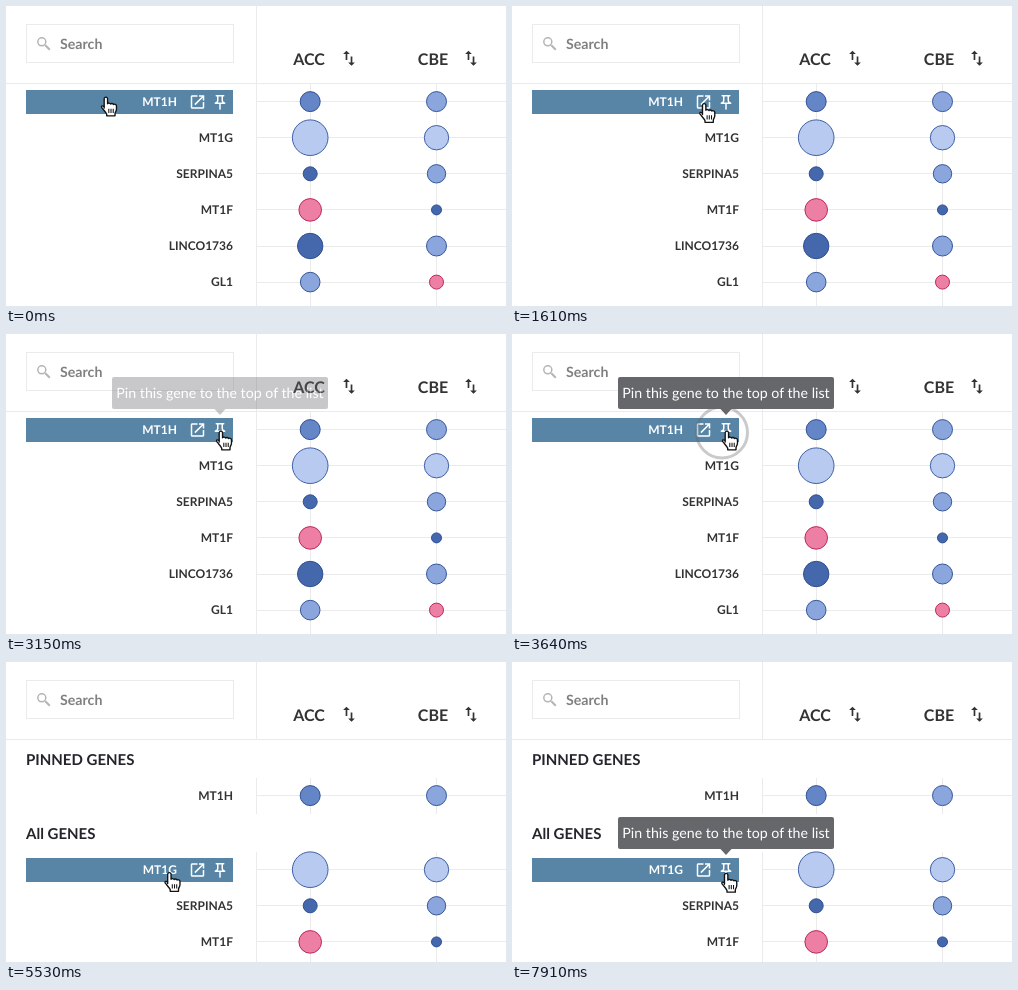
These frames come from a looping animation (500 px wide and 300 px high, 8000 ms). An HTML page:

```html
<!DOCTYPE html>
<html lang="en">
<head>
<meta charset="utf-8">
<title>Pin a gene</title>
<style>
  html, body { margin: 0; width: 100%; height: 100%; overflow: hidden; background: #fff; }
  svg { display: block; width: 100vw; height: 100vh; }
  text { font-family: Lato, "Open Sans", sans-serif; font-weight: 700; fill: #333; text-rendering: geometricPrecision; }
  .search { font-size: 14.2px; fill: #808080; }
  .col { font-size: 16px; text-anchor: middle; }
  .head { font-size: 15px; fill: #24242c; }
  .row { font-size: 12px; text-anchor: end; }
  .tip text { font-size: 14.2px; font-weight: 400; fill: #fff; text-anchor: middle; }
  .tip path, .tip rect { fill: #65676b; }
  .bar rect { fill: #5885a6; }
  .bar text, .bar path { fill: #fff; }
  .line { fill: none; stroke: #ebebeb; }
  .hand { fill: #fff; stroke: #111; stroke-width: 1.3; stroke-linejoin: round; }
  .arrow { fill: #555; stroke: #fff; opacity: .88; }
</style>
</head>
<body>
<svg id="stage" viewBox="0 0 500 300" xmlns="http://www.w3.org/2000/svg"></svg>
<script>
const LOOP = 8000, STEP = 70, LAST = 7910;
const COLS = [304.2, 430.5];

const TONES = {
  pale: ['#b9caf0', '#3f60a5'],
  light: ['#8aa6dd', '#35569c'],
  mid: ['#6485c6', '#2f4f96'],
  dark: ['#4568ac', '#2f4f94'],
  pink: ['#ec7fa3', '#bd2a60']
};

// name, then radius and tone for each column
const GENES = [
  ['MT1H', 10, 'mid', 10, 'light'],
  ['MT1G', 17.8, 'pale', 12.2, 'pale'],
  ['SERPINA5', 7, 'dark', 9.2, 'light'],
  ['MT1F', 11.3, 'pink', 5, 'dark'],
  ['LINCO1736', 12.7, 'dark', 10, 'light'],
  ['GL1', 9.8, 'light', 7, 'pink']
];

const ICONS = {
  sort: 'M9 3L5 7h3v7h2V7h3L9 3zm7 14v-7h-2v7h-3l4 4 4-4h-3z',
  open: 'M19 19H5V5h7V3H5c-1.1 0-2 .9-2 2v14c0 1.1.9 2 2 2h14c1.1 0 2-.9 2-2v-7h-2v7z' +
        'M14 3v2h3.6l-9.8 9.8 1.4 1.4L19 6.4V10h2V3h-7z',
  pin: 'M14 4v5c0 1.1.4 2.2 1 3H9c.6-.9 1-1.9 1-3V4h4m3-2H7c-.6 0-1 .4-1 1s.4 1 1 1h1v5' +
       'c0 1.7-1.3 3-3 3v2h6v7l1 1 1-1v-7h6v-2c-1.7 0-3-1.3-3-3V4h1c.6 0 1-.4 1-1s-.4-1-1-1z'
};

const icon = (name, x, y, k, fill = '#333') =>
  `<path d="${ICONS[name]}" fill="${fill}" fill-rule="evenodd" transform="translate(${x - 12 * k} ${y - 12 * k}) scale(${k})"/>`;
const text = (cls, x, y, s) => `<text class="${cls}" x="${x}" y="${y}">${s}</text>`;
const line = d => `<path class="line" d="${d}"/>`;
const crisp = v => Math.floor(v) + .5;

function dot(x, y, r, tone) {
  const [fill, stroke] = TONES[tone];
  return `<circle cx="${x}" cy="${y}" r="${r}" fill="${fill}" stroke="${stroke}"/>`;
}

function row([name, r1, tone1, r2, tone2], i, dy) {
  const y = 95.6 + 36.1 * i + dy;
  return line(`M251 ${crisp(y)}H500`) +
    dot(COLS[0], y, r1, tone1) + dot(COLS[1], y, r2, tone2) +
    text('row', 227, Math.round(y + 4.2), name);
}

const uprights = (top, end) => line([250, ...COLS].map(x => `M${crisp(x)} ${top}V${end}`).join(''));

const bar = (id, name, y) => `<g class="bar" id="${id}">
  <rect x="20" y="${y - 12}" width="207" height="24"/>
  ${text('row', 171, y + 4, name)}
  ${icon('open', 191.5, y, .75, '#fff')}${icon('pin', 214, y + .4, .75, '#fff')}</g>`;

const tip = (id, label, x, y, w) => `<g class="tip" id="${id}">
  <rect x="${x - w / 2}" y="${y}" width="${w}" height="32" rx="2"/>
  <path d="M${x - 6} ${y + 31.5}h12l-6 6.5z"/>
  ${text('', x, y + 21, label)}</g>`;
const pinTip = (id, y) => tip(id, 'Pin this gene to the top of the list', 214, y, 216);

document.getElementById('stage').innerHTML = `
  <rect width="500" height="300" fill="#fff"/>
  ${line('M0 77.5H500M250.5 0V77')}
  <rect class="line" x="20.5" y="18.5" width="207" height="38"/>
  <path d="M39.3 39.3L43.8 43.8" stroke="#b5b5b5" stroke-width="2"/>
  <circle cx="35.8" cy="35.8" r="4" fill="none" stroke="#b5b5b5" stroke-width="1.5"/>
  ${text('search', 54, 43, 'Search')}
  ${text('col', 303, 59, 'ACC')}${text('col', 427, 59, 'CBE')}
  ${icon('sort', 343, 52.3, .84)}${icon('sort', 465, 52.3, .84)}
  <g id="before">
    ${uprights(78, 300)}
    ${GENES.map((g, i) => row(g, i, 0)).join('')}
    ${bar('bar1', 'MT1H', 96)}
  </g>
  <g id="after">
    ${uprights(116, 152)}${uprights(190, 300)}
    ${text('head', 20, 103, 'PINNED GENES')}${text('head', 20, 177, 'All GENES')}
    ${GENES.map((g, i) => row(g, i, i ? 76 : 38)).join('')}
    ${bar('bar2', 'MT1G', 208)}
  </g>
  <circle id="ring" cx="210" cy="98.5" fill="none" stroke="#666" stroke-width="3"/>
  ${tip('openTip', 'Open gene details page', 191, 44, 158)}
  ${pinTip('pinTip1', 43)}${pinTip('pinTip2', 155)}
  <g id="cursor">
    <g id="hand" class="hand" transform="translate(-.8 -.7) scale(1.05)">
      <path d="M3.8 11.2V2.4a1.6 1.6 0 0 1 3.2 0V7.2c.4-1.1 2.5-1 2.9.2.5-.9 2.4-.7 2.8.5.6-.7 2.8-.5 2.8 1.3v3.2c0 1.6-1.2 2.6-1.4 4.2v2H6.2V17c-.6-1.7-2.9-3.8-4.7-6.2-.9-1.5.8-2.6 2.3-.6z"/>
      <path d="M8.2 11.8v4M10.3 11.8v4M12.4 11.8v4" stroke-width="1"/>
    </g>
    <path id="arrow" class="arrow" d="M0 0L16 4.5 10 8.2 14.5 13 12 15 7.8 10.5 5 17z"/>
  </g>`;

const smooth = u => u * u * (3 - 2 * u);
const easeOut = u => 1 - (1 - u) ** 1.6;
const ramp = (t, from, to) => Math.min(1, Math.max(0, (t - from) / (to - from)));

const START = { x: 95, y: 91 };
const MOVES = [
  { from: 70, to: 630, x: 210, y: 97 },
  { from: 630, to: 1120, x: 187.3, y: 97.5 },
  { from: 2240, to: 2800, x: 210, y: 97 },
  { from: 4690, to: 5180, x: 158.5, y: 210.5, ease: easeOut },
  { from: 6230, to: 6720, x: 212.3, y: 211, bow: -7 },
  { from: 6720, to: 7070, x: 209.3, y: 211.3 }
];

// fade in from-to, then fade out from-to
const FADES = {
  openTip: [1610, 1890, 2240, 2660],
  pinTip1: [3010, 3360, 4200, 4480],
  pinTip2: [7490, 7910, LOOP, LOOP + 1],
  bar2: [5390, 5530, LOOP, LOOP + 1]
};

const SWAP = 4270, HAND_BACK = 5110;
const PULSE = { first: 3570, every: 350, count: 3, length: 210 };

function cursorAt(t) {
  let { x, y } = START;
  for (const m of MOVES) {
    const u = ramp(t, m.from, m.to), k = (m.ease || smooth)(u);
    x += (m.x - x) * k;
    y += (m.y - y) * k + (m.bow || 0) * Math.sin(Math.PI * u);
  }
  return [x, y];
}

const el = id => document.getElementById(id);
const show = (id, on) => el(id).setAttribute('visibility', on ? 'visible' : 'hidden');

function drawRing(t) {
  const since = t - PULSE.first, age = since % PULSE.every;
  const on = since >= 0 && since < PULSE.every * PULSE.count && age < PULSE.length;
  show('ring', on);
  if (!on) return;
  const u = age / PULSE.length;
  el('ring').setAttribute('r', 16 + 11.5 * easeOut(Math.min(1, u * 2)));
  el('ring').setAttribute('opacity', .36 * (1 - u ** 3));
}

function draw(t) {
  show('before', t < SWAP);
  show('after', t >= SWAP);
  for (const id in FADES) {
    const [a, b, c, d] = FADES[id];
    el(id).setAttribute('opacity', smooth(ramp(t, a, b)) * (1 - ramp(t, c, d) ** 2));
  }
  drawRing(t);
  const arrow = t >= SWAP && t < HAND_BACK;
  show('arrow', arrow);
  show('hand', !arrow);
  el('cursor').setAttribute('transform', `translate(${cursorAt(t)})`);
}

const origin = performance.now();
function tick() {
  const t = (performance.now() - origin) % LOOP;
  draw(Math.min(Math.floor(t / STEP) * STEP, LAST));
  requestAnimationFrame(tick);
}
tick();
</script>
</body>
</html>
```
